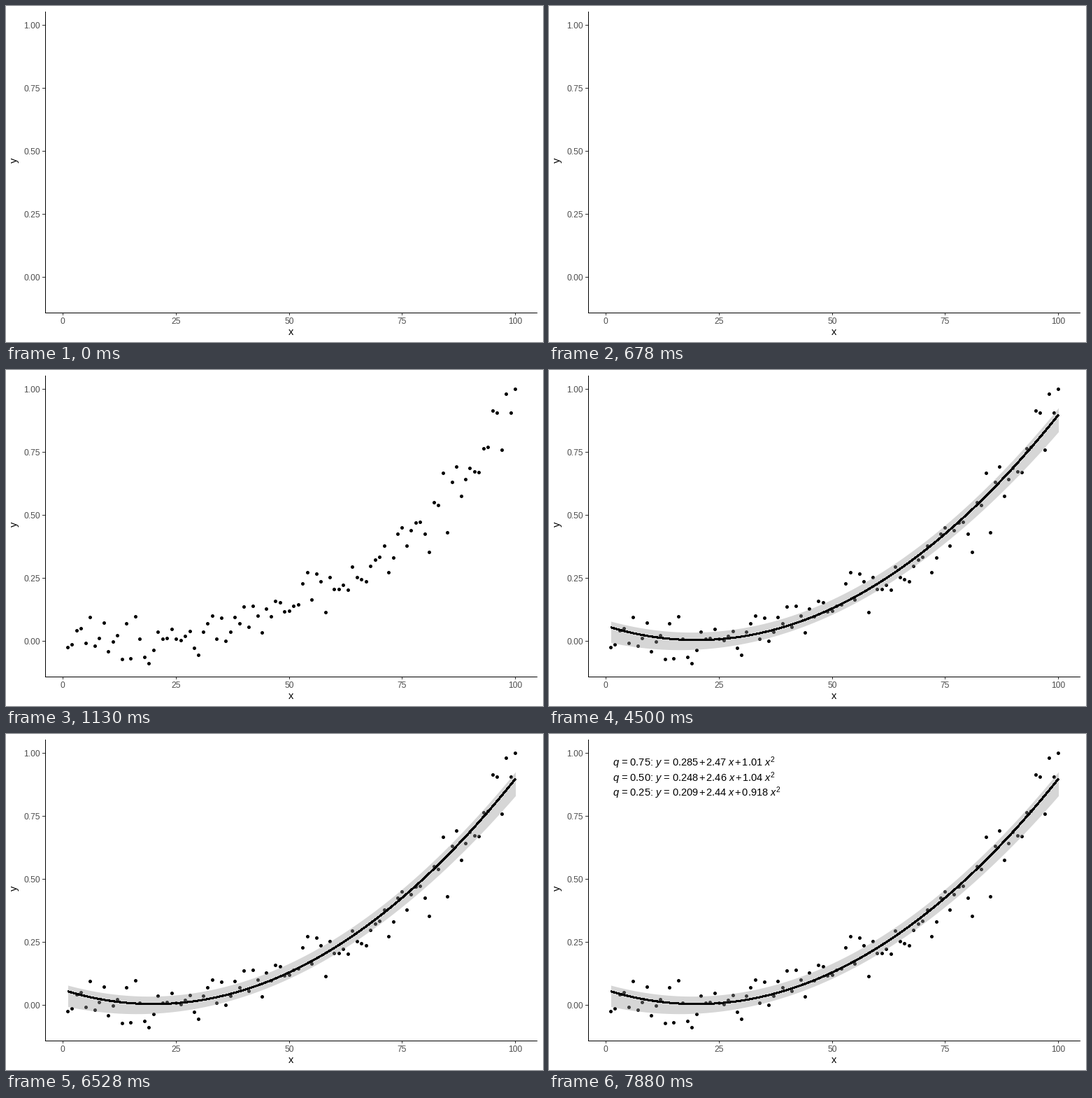
These frames come from a looping animation (768 px wide and 480 px high, 8 s). A matplotlib script:

```python
import math
import random

import numpy as np
import matplotlib.pyplot as plt
from matplotlib.animation import FuncAnimation

W, H, DPI = 768, 480, 72          # at 72 dpi one point is one pixel
INTERVAL, FRAMES = 125, 64
POINTS_AT, FIT_AT, LABELS_AT = 9, 36, 63
FONT = "Liberation Sans"

plt.rcParams.update({
    "font.family": FONT, "mathtext.fontset": "custom", "mathtext.rm": FONT,
    "mathtext.cal": FONT, "mathtext.it": FONT + ":italic"})
fig = plt.figure(figsize=(W / DPI, H / DPI), dpi=DPI, facecolor="white")
ax = fig.add_axes([0, 0, 1, 1])
ax.set_xlim(0, W)
ax.set_ylim(H - 1, -1)            # whole numbers are pixel rows from the top
ax.axis("off")


def px(x):
    return 81.93 + 6.467 * np.asarray(x)


def py(y):
    return 386.87 - 360 * np.asarray(y)


def segment(xs, ys, color="black"):
    ax.plot(xs, ys, color=color, lw=1, antialiased=False,
            solid_capstyle="projecting")


def text(x, y, s, size=14.67, **style):
    return ax.text(x, y, s, fontsize=size, va="baseline", **style)


def r_normals(count, seed):
    """Normal deviates as R draws them: Mersenne Twister, inversion."""
    state = []
    for _ in range(675):
        seed = (69069 * seed + 1) % 2**32
        state.append(seed)
    twister = random.Random()
    twister.setstate((3, tuple(state[51:]) + (624,), None))

    def uniform():
        return twister.getrandbits(32) / 2**32

    big = 2**27
    p = [(int(big * uniform()) + uniform()) / big for _ in range(count)]
    z = np.linspace(-5, 5, 20001)
    cdf = [0.5 * (1 + math.erf(v / math.sqrt(2))) for v in z]
    return np.interp(p, cdf, z)


def quadratic(x, a, b, c):
    """Second-degree fit in polynomials orthonormal over 1..100."""
    u = x - 50.5
    return a + b * u / 288.66 + c * (u**2 - 833.25) / 7451.7


# Axes
TICK, LABEL = "#333333", "#4d4d4d"
for v in (0, 25, 50, 75, 100):
    x = np.floor(px(v))
    segment([x, x], [438, 440], TICK)
    text(x, 453, str(v), 12, color=LABEL, ha="center")
for v in (0, 0.25, 0.5, 0.75, 1):
    y = np.floor(py(v))
    segment([52, 55], [y, y], TICK)
    text(49, y + 5, f"{v:.2f}", 12, color=LABEL, ha="right")
segment([56, 56], [7, 437])
segment([56, 759], [437, 437])
text(407.5, 469, "x", ha="center")
text(16, 219.5, "y", ha="center", rotation=90, rotation_mode="anchor")

# A noisy cubic, scaled to a maximum of one
x = np.arange(1, 101)
y = x + x**2 + x**3 + r_normals(100, 4321) * np.mean(x**3) / 4
points = ax.plot(np.floor(px(x)), np.floor(py(y / y.max())), "o", ms=5,
                 mew=0, color="black", antialiased=False)

# Quantile band and median
fits = {"0.75": ("0.285", "2.47", "1.01"),
        "0.50": ("0.248", "2.46", "1.04"),
        "0.25": ("0.209", "2.44", "0.918")}
grid = np.linspace(1, 100, 80)
upper, median, lower = (py(quadratic(grid, *map(float, coefs))) - 1
                        for coefs in fits.values())
band = ax.fill_between(px(grid), upper + 1.1, lower - 1.1, color="#999999",
                       alpha=0.4, lw=0, antialiased=False, zorder=3)
curve, = ax.plot(px(grid), median - 0.5, color="black", lw=2,
                 antialiased=False, solid_capstyle="butt", zorder=4)
fit = [band, curve]

# Fitted equations
PLUS = r"$\hspace{0.13}{+}\hspace{0.13}$"
labels = [text(91, 45 + 21.5 * row,
               f"$q$ = {q}: $y$ = {a}{PLUS}{b} $x${PLUS}{c} $x^2$")
          for row, (q, (a, b, c)) in enumerate(fits.items())]

stages = [(POINTS_AT, points), (FIT_AT, fit), (LABELS_AT, labels)]


def update(frame):
    for start, artists in stages:
        for artist in artists:
            artist.set_visible(frame >= start)
    return points + fit + labels


anim = FuncAnimation(fig, update, frames=FRAMES, interval=INTERVAL,
                     repeat=True, repeat_delay=0, blit=False)
plt.show()
```
